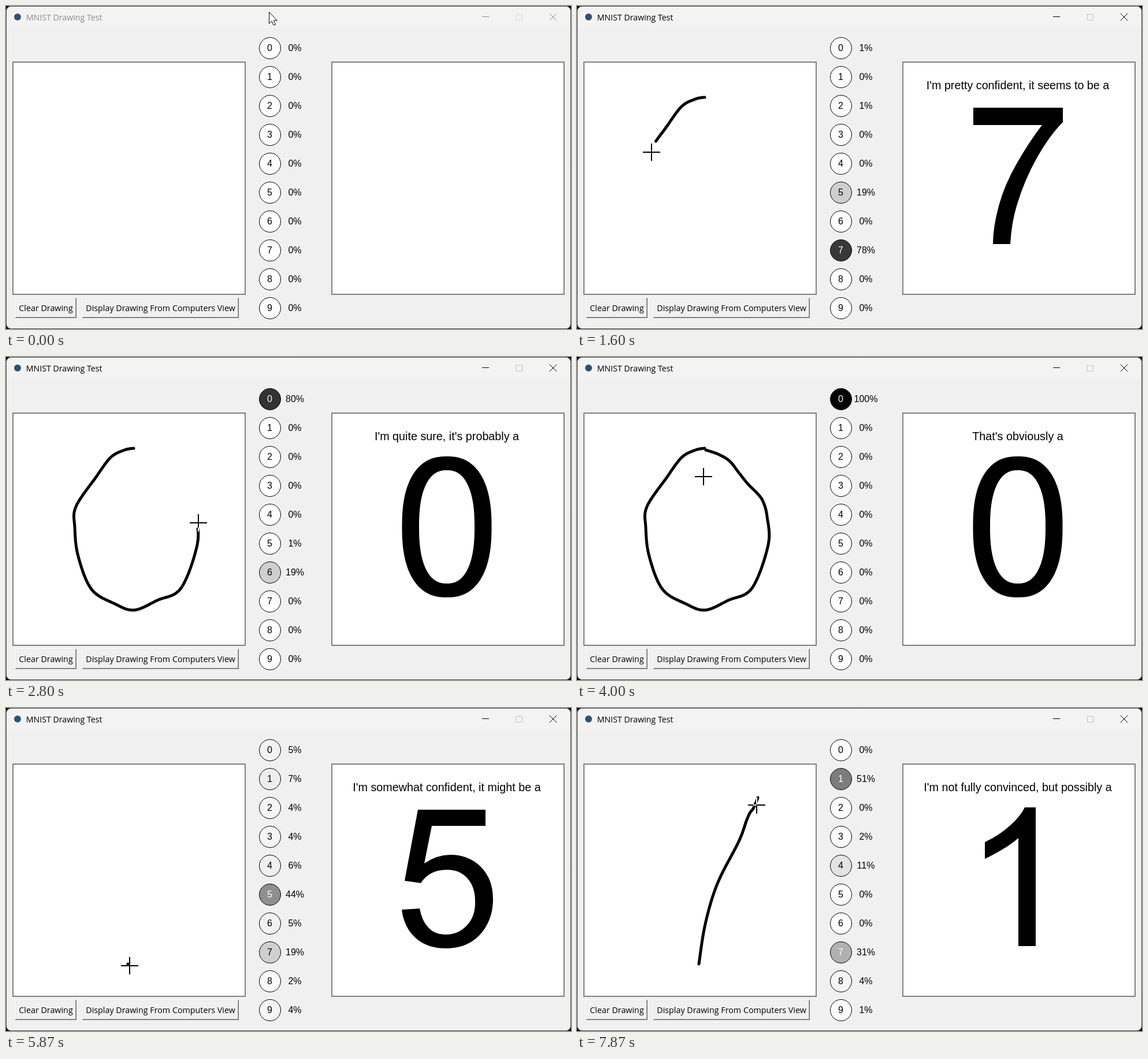
Write an HTML page with a canvas that moves like this. It is 978 by 559 pixels and loops after 8000 ms.

```html
<!DOCTYPE html>
<html lang="en">
<head>
<meta charset="utf-8">
<title>MNIST Drawing Test</title>
<style>
html, body { margin: 0; width: 100%; height: 100%; overflow: hidden; background: #000; }
canvas { display: block; width: 978px; height: 559px; }
</style>
</head>
<body>
<canvas id="stage" width="978" height="559"></canvas>
<script>
const ctx = document.getElementById('stage').getContext('2d');
const W = 978, H = 559, STEP = 1000 / 15, STEPS = 120;
const UI = '"Open Sans", "Noto Sans", sans-serif';
const SANS = 'Arial, "Liberation Sans", sans-serif';
const ACTIVATE = 16, PRESS = 68, CLEAR = 71;
const CENTER = 763;

// The pen goes down at `press`, leaves at `start` and passes one key point every two steps.
const strokes = [
  { press: 16, start: 17, points: [[221, 158], [205, 161], [181, 174], [155, 209], [121, 259], [119, 295],
    [125, 345], [148, 402], [188, 427], [222, 438], [262, 421], [303, 400], [331, 325], [329, 276],
    [322, 250], [312, 236], [296, 220], [280, 200], [264, 180], [244, 168], [223, 161]] },
  { press: 83, start: 89, points: [[211, 443], [222, 374], [243, 304], [280, 231], [293, 196], [299, 182],
    [305, 174], [310, 163], [313, 155]] }
];
for (const s of strokes) s.end = s.start + 2 * (s.points.length - 1);

// Pointer glides while the pen is up
const home = [455, 10];
const glides = [
  { from: 1, to: 6, at: [266, 158] },
  { from: 10, to: 14, at: [223, 164] },
  { from: 56, to: 57, at: [226, 166] },
  { from: 59, to: 60, at: [219, 207] },
  { from: 60, to: 66, at: [90, 514] },
  { from: 74, to: 77, at: [225, 449] },
  { from: 104, to: 105, at: [316, 158] },
  { from: 112, to: 118, at: [311, 168] }
];

// Classifier output in percent per digit, blended between steps
const unsure = { 0: 5, 1: 7, 2: 4, 3: 4, 4: 6, 5: 44, 6: 5, 7: 19, 8: 2, 9: 4 };
const guesses = [
  [[18, unsure], [24, { 0: 1, 2: 1, 5: 19, 7: 78 }], [34, { 0: 18, 5: 24, 6: 58 }],
   [42, { 0: 80, 5: 1, 6: 19 }], [50, { 0: 100 }]],
  [[89, unsure], [98, { 1: 16, 3: 1, 4: 1, 7: 79, 8: 2, 9: 1 }],
   [105, { 1: 51, 3: 2, 4: 11, 7: 31, 8: 4, 9: 1 }]]
];

const phrases = [
  [48, "I'm somewhat confident, it might be a"],
  [60, "I'm not fully convinced, but possibly a"],
  [78.5, "I'm pretty confident, it seems to be a"],
  [98, "I'm quite sure, it's probably a"],
  [Infinity, "That's obviously a"]
];

const bigDigits = {
  0: superellipse(superellipse(new Path2D(), 77.5, 122), 48, 98),
  1: new Path2D('M794 412H764V225Q753 235 736 245T706 261V232Q730 221 749 204T775 172H794Z'),
  5: new Path2D('M685 349L716 347Q720 369 732 381T762 392Q783 392 798 376T812 334Q812 309 798 294T762 280' +
    'Q747 280 736 286T718 303L690 299L713 176H830V204H737L724 269Q746 254 769 254Q801 254 822 275T843 331' +
    'Q843 363 825 387Q802 416 762 416Q729 416 709 398T685 349Z'),
  7: new Path2D('M686 176H841V201Q818 224 796 263T761 346Q752 376 750 412H720Q720 383 730 346T762 271T805 206H686Z')
};
const arrow = new Path2D('M.5 .5V20.5L5 16.3L8.3 23.5L11.6 22L8.4 15H14.3Z');

function superellipse(path, rx, ry) {
  const bend = v => Math.sign(v) * Math.abs(v) ** (2 / 2.4);
  const ring = new Path2D();
  for (let a = 0; a < 2 * Math.PI; a += 0.02) {
    ring.lineTo(CENTER + rx * bend(Math.cos(a)), 294 + ry * bend(Math.sin(a)));
  }
  ring.closePath();
  path.addPath(ring);
  return path;
}

const clamp = (v, lo, hi) => Math.min(hi, Math.max(lo, v));
const mix = (a, b, u) => a + (b - a) * u;

// Catmull-Rom spline through the key points
function penAt({ start, points }, step) {
  const last = points.length - 1;
  const t = clamp((step - start) / 2, 0, last);
  const i = Math.min(Math.floor(t), last - 1), u = t - i;
  const [a, b, c, d] = [-1, 0, 1, 2].map(k => points[clamp(i + k, 0, last)]);
  return [0, 1].map(k => b[k] + u / 2 * (c[k] - a[k] +
    u * (2 * a[k] - 5 * b[k] + 4 * c[k] - d[k] + u * (3 * (b[k] - c[k]) + d[k] - a[k]))));
}

function pointerAt(step) {
  const pen = strokes.find(s => step >= s.press && step <= s.end);
  // The pointer runs slightly ahead of the ink.
  if (pen) return penAt(pen, step + 0.6).map(v => v + 3);
  return glides.reduce((pos, { from, to, at }) => {
    const u = clamp((step - from) / (to - from), 0, 1);
    return pos.map((v, k) => mix(v, at[k], u));
  }, home);
}

function guessAt(keys, step) {
  const next = Math.max(1, keys.findIndex(k => k[0] > step));
  const i = step >= keys[keys.length - 1][0] ? keys.length - 1 : next;
  const [[t0, a], [t1, b]] = [keys[i - 1], keys[i]];
  const u = clamp((step - t0) / (t1 - t0), 0, 1);
  return Array.from({ length: 10 }, (_, d) => mix(a[d] || 0, b[d] || 0, u));
}

function rect(color, x, y, w, h) {
  ctx.fillStyle = color;
  ctx.fillRect(x, y, w, h);
}

function text(str, x, y, font, color, align = 'left') {
  ctx.font = font;
  ctx.fillStyle = color;
  ctx.textAlign = align;
  ctx.fillText(str, x, y);
}

function drawWindow(active) {
  const ink = active ? '#000' : '#8d8d8d';
  rect('#000', 0, 0, W, H);
  ctx.save();
  ctx.beginPath();
  ctx.roundRect(0.5, 0.5, W - 1, H - 1, 8);
  ctx.clip();
  rect('#f0f0f0', 0, 0, W, H);
  rect('#f3f3f3', 0, 0, W, 38);
  ctx.restore();
  ctx.lineWidth = 1;
  ctx.strokeStyle = '#3f3f3f';
  ctx.stroke();

  ctx.fillStyle = '#34506f';
  ctx.beginPath();
  ctx.arc(20, 19, 6, 0, 7);
  ctx.fill();
  text('MNIST Drawing Test', 34.7, 25, '14.2px ' + UI, ink);

  rect(ink, 824, 18, 12, 1);
  ctx.strokeStyle = active ? '#c3c3c3' : '#d8d8d8';
  ctx.strokeRect(883.5, 14.5, 10, 10);
  ctx.strokeStyle = ink;
  ctx.beginPath();
  ctx.moveTo(941, 13); ctx.lineTo(953, 25);
  ctx.moveTo(953, 13); ctx.lineTo(941, 25);
  ctx.stroke();
}

function drawPanel(x) {
  rect('#808080', x, 96, 404, 404);
  rect('#fff', x + 2, 98, 400, 400);
}

function drawButton(label, x, w, pressed) {
  const y = 505, h = 35, shift = pressed ? 1 : 0;
  const outer = ['#fff', '#696969'], inner = ['#e3e3e3', '#a0a0a0'];
  rect(outer[1 - shift], x, y, w, h);
  rect(outer[shift], x, y, w - 1, h - 1);
  rect(inner[1 - shift], x + 1, y + 1, w - 2, h - 2);
  rect(inner[shift], x + 1, y + 1, w - 3, h - 3);
  rect('#f0f0f0', x + 2, y + 2, w - 4, h - 4);
  text(label, x + w / 2 + shift, 528 + shift, '14.3px ' + UI, '#000', 'center');
}

function drawScores(scores) {
  scores.forEach((score, d) => {
    const y = 73 + 50 * d, pct = Math.round(score);
    const gray = Math.round(255 * (1 - pct / 100));
    ctx.beginPath();
    ctx.arc(457, y, 18.5, 0, 7);
    ctx.fillStyle = `rgb(${gray},${gray},${gray})`;
    ctx.fill();
    ctx.lineWidth = 1;
    ctx.strokeStyle = '#000';
    ctx.stroke();
    text(d, 456.5, y + 5, '16px ' + SANS, pct > 25 ? '#fff' : '#000', 'center');
    text(pct + '%', 500, y + 5, '16px ' + SANS, '#000', 'center');
  });
}

function drawVerdict(scores) {
  const top = Math.max(...scores), digit = scores.indexOf(top);
  const phrase = phrases.find(([limit]) => top < limit)[1];
  text(phrase, CENTER, 144, '19.75px ' + SANS, '#000', 'center');
  if (bigDigits[digit]) ctx.fill(bigDigits[digit], 'evenodd');
  else text(digit, CENTER, 412, '333px ' + SANS, '#000', 'center');
}

function drawStroke(stroke, step) {
  const end = Math.min(step, stroke.end);
  ctx.beginPath();
  ctx.moveTo(...penAt(stroke, stroke.start));
  for (let t = stroke.start; t < end; t += 0.2) ctx.lineTo(...penAt(stroke, t));
  ctx.lineTo(...penAt(stroke, end));
  ctx.lineWidth = 5;
  ctx.lineCap = ctx.lineJoin = 'round';
  ctx.strokeStyle = '#000';
  ctx.stroke();
}

function drawPointer(step) {
  const [x, y] = pointerAt(step).map(Math.round);
  ctx.save();
  if (x > 12 && x < 414 && y > 97 && y < 499) {
    ctx.globalCompositeOperation = 'difference';
    ctx.fillStyle = '#fff';
    ctx.beginPath();
    ctx.rect(x - 15, y - 1, 30, 2);
    ctx.rect(x - 1, y - 15, 2, 30);
    ctx.fill();
  } else {
    ctx.translate(x, y);
    ctx.fillStyle = '#fff';
    ctx.strokeStyle = '#000';
    ctx.lineWidth = 1;
    ctx.fill(arrow);
    ctx.stroke(arrow);
  }
  ctx.restore();
}

function draw(step) {
  const run = step >= CLEAR ? 1 : 0;
  const started = step >= strokes[run].press;
  const scores = started ? guessAt(guesses[run], step) : Array(10).fill(0);
  drawWindow(step >= ACTIVATE);
  drawPanel(11);
  drawPanel(563);
  drawButton('Clear Drawing', 16, 106, step >= PRESS && step < CLEAR);
  drawButton('Display Drawing From Computers View', 132, 271, false);
  drawScores(scores);
  if (started) {
    drawVerdict(scores);
    drawStroke(strokes[run], step);
  }
  drawPointer(step);
}

function tick() {
  draw(Math.floor((performance.now() + 4) / STEP) % STEPS);
  requestAnimationFrame(tick);
}
tick();
</script>
</body>
</html>
```
